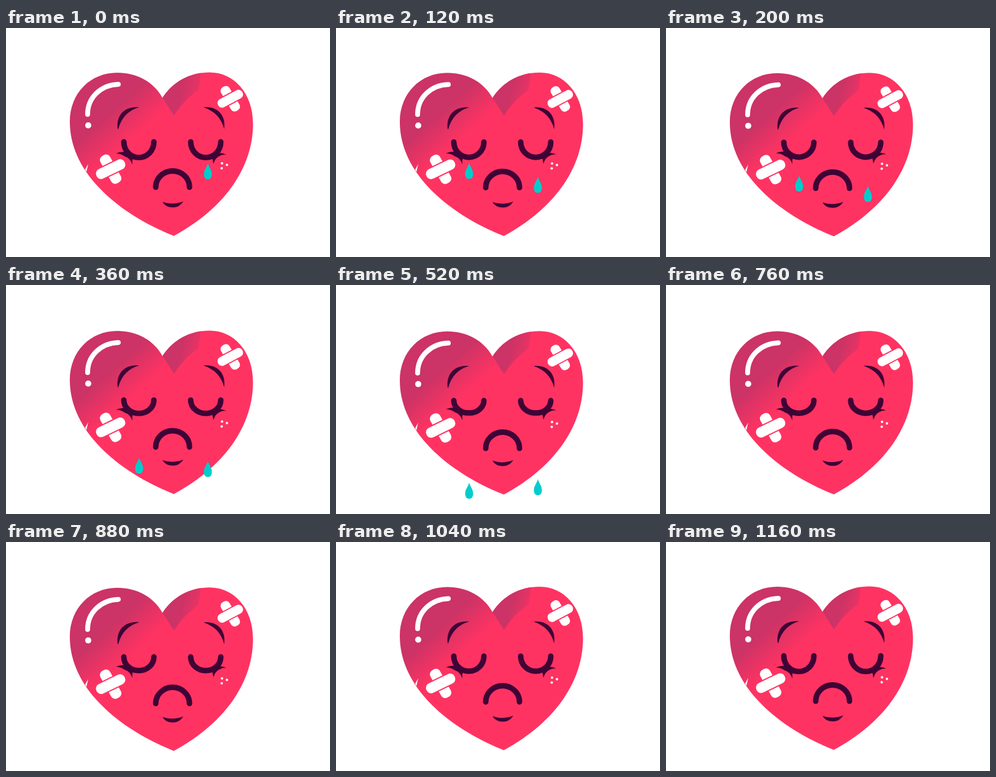
An HTML page that plays this animation: 528 by 374 pixels, repeating every 1200 ms.

```html
<!DOCTYPE html>
<html lang="en">
<head>
<meta charset="utf-8">
<title>Sad heart</title>
<style>
  html, body { margin: 0; width: 100%; height: 100%; overflow: hidden; background: #fff; }
  svg { display: block; width: 100vw; height: 100vh; }
  .line { fill: none; stroke: #3e0436; stroke-width: 9; stroke-linecap: round; }
  .ink { fill: #3e0436; }
  .white { fill: #fff; }
</style>
</head>
<body>
<svg viewBox="0 0 528 374">
  <defs>
    <path id="shape" d="M255 114C241 88 213 73 181 73C138 73 104 106 104 153C104 235 180 302 273.500 339.500C352 297 403 231 402.500 156C402.500 107 372 72.500 332 72.500C299 72.500 272 88 255 114Z"/>
    <clipPath id="inside"><use href="#shape"/></clipPath>
    <linearGradient id="shadeL" gradientUnits="userSpaceOnUse" x1="145" y1="160" x2="183" y2="202">
      <stop stop-color="#cc3366"/>
      <stop offset="1" stop-color="#ff3362"/>
    </linearGradient>
    <linearGradient id="shadeR" gradientUnits="userSpaceOnUse" x1="285" y1="100" x2="318" y2="110">
      <stop stop-color="#cc3366"/>
      <stop offset="1" stop-color="#f03364"/>
    </linearGradient>
    <path id="tear" fill="#00cccc" d="M0 0C1 6 6.500 11 6.500 18C6.500 24 4 26.500 0 26.500C-4 26.500 -6.500 24 -6.500 18C-6.500 11 -1 6 0 0Z"/>
    <g id="bandage" class="white">
      <rect x="-25.500" y="-9" width="51" height="18" rx="7.500" transform="rotate(61)"/>
      <rect x="-25.500" y="-8.500" width="51" height="17" rx="8" transform="rotate(-26)" stroke="#ff3362" stroke-width="4" paint-order="stroke"/>
    </g>
  </defs>

  <g id="heart">
    <use href="#shape" fill="url(#shadeL)"/>
    <path clip-path="url(#inside)" fill="url(#shadeR)" d="M255 113Q263 127 274 143C285 125 298 112 314 101L318 70H250Z"/>
    <path class="white" d="M134 222L129 231L131 235Z"/>

    <path d="M183 92C155 93 133 113 133 141" fill="none" stroke="#fff" stroke-width="8" stroke-linecap="round"/>
    <circle class="white" cx="134" cy="159" r="5"/>
    <use href="#bandage" x="170.500" y="230.500"/>
    <use href="#bandage" transform="translate(365.500 115.500) rotate(-2) scale(.88)"/>

    <path class="ink" d="M182 165C179 141 195 127 217 129.500C200 134 188 146 183 165Z"/>
    <path class="ink" d="M322 129.500C345 127 359 143 355.500 165C351 148 341 136 322 129.500Z"/>
    <path id="eyes" class="line"/>
    <g id="lashes" class="ink">
      <path d="M179 205Q189 200 200 204L207 212Q205 217 206 223Q202 212 194 210Q187 205 179 205Z"/>
      <path d="M359 207Q351 202 342 206L336 212Q337 217 338 222Q341 212 348 209Q353 206 359 207Z"/>
    </g>
    <path class="ink" d="M255 284Q272 290 289 283Q283 293 272 293Q260 293 255 284Z"/>
    <path id="mouth" class="line" d="M244 260A27.500 26.500 0 0 1 299 260"/>
    <g class="white">
      <circle cx="352" cy="221" r="2"/>
      <circle cx="360" cy="223.500" r="2"/>
      <circle cx="351.500" cy="229" r="2"/>
    </g>
  </g>
  <use id="left" href="#tear" x="217"/>
  <use id="right" href="#tear" x="329"/>
</svg>

<script>
  const LOOP = 1200, STEP = 40;
  const get = id => document.getElementById(id);
  const shift = (id, y) => get(id).setAttribute("transform", `translate(0 ${y})`);
  const lid = (x, depth) => `M${x} 186a24.5 ${depth} 0 0 0 49 0`;

  // A tear falls at constant speed and shows only from start to end.
  function drop(id, t, start, end, y, speed) {
    shift(id, y + speed * (t - start));
    get(id).setAttribute("visibility", t >= start && t < end ? "visible" : "hidden");
  }

  function draw(now) {
    const t = Math.floor(now % LOOP / STEP) * STEP;
    const sink = (1 - Math.cos(2 * Math.PI * t / LOOP)) / 2;
    const depth = 25.5 - 5.5 * sink;
    shift("heart", 3 * sink);
    shift("mouth", 4 * sink);
    shift("lashes", -5 * sink);
    get("eyes").setAttribute("d", lid(192, depth) + lid(301, depth));
    drop("right", t, 0, 680, 220.5, 0.185);
    drop("left", t, 120, 720, 220, 0.256);
    requestAnimationFrame(draw);
  }
  draw(0);
</script>
</body>
</html>
```
